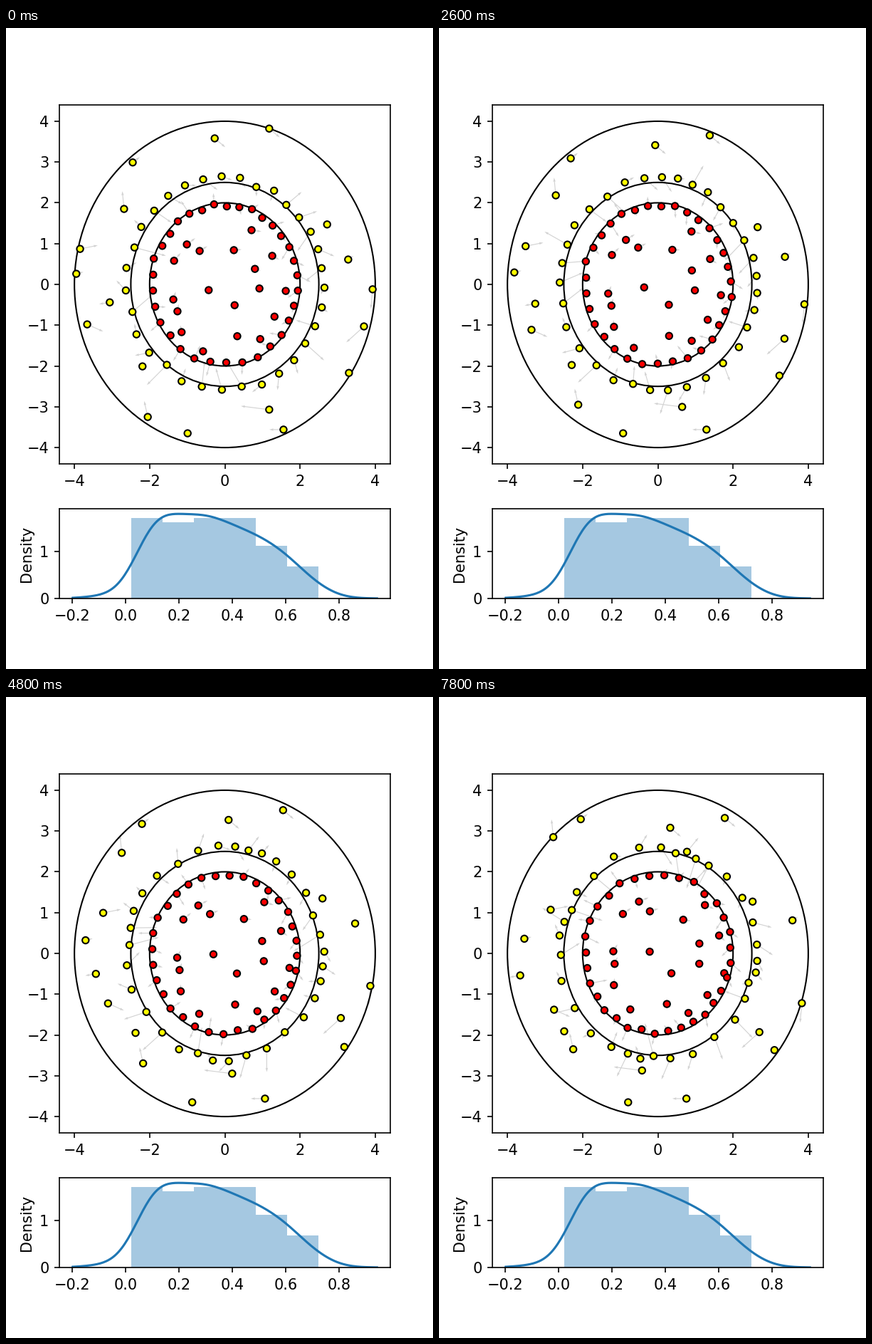
Animation of 600x900 px, one loop 8000 ms. Source, as a matplotlib script:

```python
import numpy as np
import matplotlib.pyplot as plt
from matplotlib.animation import FuncAnimation

FRAMES, STEP_MS = 40, 200
RING = 32
frame = np.arange(FRAMES)[:, None]
s = frame / (FRAMES - 1)
rng = np.random.default_rng(4)

# Outer particles: start x, y and travel dx, dy over the loop
OUTER = np.array([
    (1.18, 3.82, .6, -.5), (-.27, 3.58, .6, -.5), (-2.45, 2.99, .4, .3),
    (-2.68, 1.85, -.1, 1), (-3.85, .87, 1, .2), (-3.95, .26, .4, .1),
    (-3.06, -.44, -.6, -.1), (-3.66, -.98, .9, -.4), (-2.19, -2.01, -.3, .1),
    (-2.05, -3.25, -.2, .9), (-.99, -3.65, .2, 0), (1.18, -3.07, -1.6, .2),
    (1.56, -3.56, -.8, 0), (3.3, -2.17, -.2, -.2), (3.7, -1.03, -1, -.9),
    (3.93, -.12, -.1, -1.1), (3.28, .61, .3, .2), (2.72, 1.47, -.2, -.2)])

# Inner particles: start points, carried by one slow swirl
INNER = np.array([
    (.71, 1.33), (1.26, .70), (.24, .84), (.80, .38), (.92, -.10), (1.62, -.16),
    (1.32, -.79), (.26, -.51), (.33, -1.27), (.94, -1.34), (-.43, -.14),
    (-.67, .82), (-1.01, .98), (-1.35, .58), (-1.37, -.37), (-1.26, -.66),
    (-1.15, -1.17), (-.58, -1.64)])


def straight(rows):
    x, y, dx, dy = rows.T
    return (x + 1j * y) + s * (dx + 1j * dy)


def swirl(points, centre=.4 - .9j, turn=.25):
    z = points[:, 0] + 1j * points[:, 1]
    return centre + (z - centre) * np.exp(-1j * turn * s)


def wave(mean, amp, peak, cycles=1):
    """A wave around the ring, in degrees, one value per particle."""
    k = np.arange(1, RING + 1)
    return mean + amp * np.cos(2 * np.pi * cycles * (k - peak) / RING)


def ring(radius, depth, spread, drift):
    """Near-even clockwise spacing with drift, bouncing off the wall."""
    angle = np.arange(RING) * 360 / RING + spread + s * drift
    period = rng.uniform(9, 16, RING)
    bounce = np.abs(np.sin(np.pi * (frame / period + rng.random(RING))))
    return (radius + depth * bounce) * np.exp(1j * np.radians(90 - angle))


reds = np.hstack([swirl(INNER),
                  ring(2, -.09, wave(-11, 7, 27), wave(3.5, 10, 10))])
yellows = np.hstack([straight(OUTER),
                     ring(2.5, .15, wave(-6, 5, 30), wave(8.5, 6, 8, 4))])
z = np.hstack([reds, yellows])
vel = np.gradient(z, axis=0) * 10
pos = np.stack([z.real, z.imag], axis=-1)
colors = ["red"] * reds.shape[1] + ["yellow"] * yellows.shape[1]

fig, (ax, hist) = plt.subplots(2, 1, figsize=(4, 6), dpi=150,
                               gridspec_kw={"height_ratios": [4, 1]})
ax.set(xlim=(-4.4, 4.4), ylim=(-4.4, 4.4),
       xticks=range(-4, 5, 2), yticks=range(-4, 5))
for radius in (2, 2.5, 4):
    ax.add_patch(plt.Circle((0, 0), radius, fill=False, lw=1))
arrows = ax.quiver(*pos[0].T, vel[0].real, vel[0].imag, color="lightgray",
                   scale=4.8, scale_units="width", width=.0025, zorder=.9)
dots = ax.scatter(*pos[0].T, s=20, c=colors, edgecolors="black",
                  linewidths=1, zorder=2)

# Speed histogram with its smoothed density
counts = np.array([20, 19, 20, 20, 13, 8])
edges = np.linspace(.0222, .7225, 7)
width = edges[1] - edges[0]
hist.bar(edges[:-1], counts / counts.sum() / width, width, align="edge",
         color="#1f77b4", alpha=.4, linewidth=0)

knots = np.linspace(-.1, .8, 10)
density = [.08, .53, 1.53, 1.80, 1.765, 1.58, 1.32, .94, .44, .1]


def bumps(x):
    return np.exp(-.5 * ((x[:, None] - knots) / .0735) ** 2)


x = np.linspace(-.198, .942, 200)
hist.plot(x, bumps(x) @ np.linalg.solve(bumps(knots), density),
          color="#1f77b4", lw=1.5)
hist.set(xlim=(-.248, .992), ylim=(0, 1.909), yticks=[0, 1], ylabel="Density",
         xticks=np.arange(-.2, .9, .2))


def update(i):
    dots.set_offsets(pos[i])
    arrows.set_offsets(pos[i])
    arrows.set_UVC(vel[i].real, vel[i].imag)
    return dots, arrows


anim = FuncAnimation(fig, update, frames=FRAMES, interval=STEP_MS,
                     repeat=True, repeat_delay=0)
plt.show()
```
